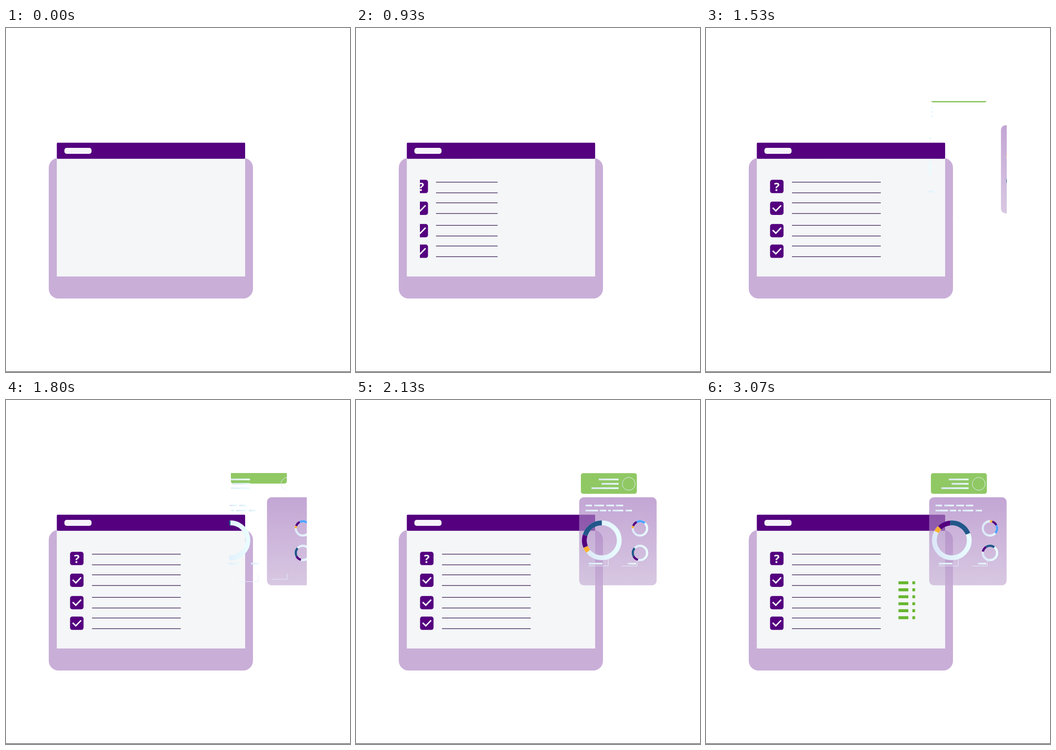
An HTML page for the animation above (3740 ms loop, 748x749 px).

```html
<!DOCTYPE html>
<html lang="en">
<head>
<meta charset="utf-8">
<title>Dashboard build-up</title>
<style>
  html, body { margin: 0; width: 100%; height: 100%; overflow: hidden; background: #fff; }
  svg { display: block; width: 100%; height: 100%; }
  text { font: 700 25px "Open Sans", "Noto Sans", sans-serif; }
</style>
</head>
<body>
<svg id="stage" viewBox="0 0 748 749">
  <defs>
    <linearGradient id="ice">
      <stop offset="0" stop-color="#dce8f8"/>
      <stop offset="1" stop-color="#e9fcff"/>
    </linearGradient>
    <linearGradient id="glass" x2="0" y2="1">
      <stop offset="0" stop-color="#a478be"/>
      <stop offset="1" stop-color="#c4abd3"/>
    </linearGradient>
  </defs>
</svg>
<script>
const LOOP = 3740, FPS = 15;
const PURPLE = '#54007f', TEAL = '#22578a', ORANGE = '#fdb333', SKY = '#4da3ff';

// First step of each entrance, and how far it has come after each step.
const START = { list: 9, cards: 23, chart: 37 };
const EASE = [0.06, 0.15, 0.25, 0.36, 0.505, 0.65, 0.79, 0.922, 1];

const stage = document.getElementById('stage');
const slides = [];
let markup = '';

const rect = (x, y, w, h, fill, r = 0, more = '') =>
  `<rect x="${x}" y="${y}" width="${w}" height="${h}" rx="${r}" fill="${fill}" ${more}/>`;

const bars = (y, ...spans) =>
  spans.map(([a, b]) => rect(a, y - 1.8, b - a, 3.6, 'url(#ice)')).join('');

const path = (d, color, width) =>
  `<path d="${d}" fill="none" stroke="${color}" stroke-width="${width}"/>`;

// A group that slides into its window from the offset (dx, dy).
function slide(phase, [x, y, w, h], dx, dy, content) {
  const i = slides.length;
  markup += `<clipPath id="win${i}">${rect(x, y, w, h, '#000')}</clipPath>
    <g clip-path="url(#win${i})"><g id="slide${i}">${content}</g></g>`;
  slides.push({ phase, dx, dy });
}

// Segments are [from, to, color], in degrees clockwise from the top.
function donut(cx, cy, r, width, turn, segments) {
  const ring = (color, more = '') =>
    `<circle cx="${cx}" cy="${cy}" r="${r}" fill="none" stroke="${color}" stroke-width="${width}" ${more}/>`;
  const arcs = segments.map(([a, b, color]) => ring(color,
    `pathLength="360" stroke-dasharray="${b - a} ${360 - b + a}" transform="rotate(${a - 90} ${cx} ${cy})"`));
  return ring('url(#ice)') +
    `<g class="spin" data-turn="${turn}" data-center="${cx} ${cy}">${arcs.join('')}</g>`;
}

function drawWindow() {
  markup += rect(93, 283, 444, 306, '#c9aed8', 21)
    + rect(110.5, 283, 409.5, 258, '#f4f6f8')
    + rect(110.5, 249.8, 409.5, 35, PURPLE, 2)
    + rect(127, 261, 59, 13, '#f6f3fb', 5)
    + rect(0, 748, 748, 1, '#222');
}

function drawList() {
  const tops = [330.6, 378, 426.7, 471.6];
  const icons = tops.map((y, i) => rect(139.3, y, 29.3, 29, PURPLE, 5) + (i
    ? path(`M145 ${y + 13.5}l6.8 6.6L163.3 ${y + 8.2}`, '#fff', 3)
    : `<text x="154" y="${y + 24.6}" fill="#fff" text-anchor="middle">?</text>`));
  slide('list', [139, 325, 35, 180], -34.5, 0, icons.join(''));

  const rules = [335.6, 380.6, 429.6, 474.6]
    .map(y => path(`M187 ${y}h193M187 ${y + 23.2}h193`, '#2c0a45', 1.3));
  slide('list', [174, 325, 207, 180], -206, 0, rules.join(''));
}

function drawCards() {
  slide('cards', [489, 159, 122, 46], 0, -45, rect(489, 159.3, 121.7, 45, '#90c864', 5));
  slide('cards', [489, 165, 83, 32], -82, 0,
    bars(173, [528, 571]) + bars(182.5, [534, 571]) + bars(192, [512, 571]));
  slide('cards', [575, 165, 36, 36], 38, 0,
    '<circle cx="593" cy="182.5" r="14" fill="none" stroke="url(#ice)"/>');

  slide('cards', [485, 211, 169, 193], 166, 0,
    rect(485.3, 211.7, 168.4, 191.8, 'url(#glass)', 10, 'opacity=".66"'));
  slide('cards', [485, 225, 116, 20], -117, 0,
    bars(229.7, [499, 513], [518, 539], [544, 561], [565, 581])
    + bars(240.7, [499, 526], [530, 544], [548, 554], [558, 581], [586, 600]));

  slide('cards', [485, 258, 94, 94], -94, 0, donut(534.5, 305.6, 38, 10.5, 68,
    [[231, 248, ORANGE], [248, 287, PURPLE], [287, 360, TEAL]]));
  slide('cards', [598, 258, 56, 100], 57, 0,
    donut(617.4, 279.6, 15.6, 4.8, 89,
      [[272, 290, ORANGE], [290, 334, PURPLE], [334, 402, SKY]])
    + donut(617.4, 333, 15.6, 4.8, 85,
      [[196, 242, PURPLE], [242, 312, TEAL]]));

  slide('cards', [485, 350, 60, 12], -58, 0, bars(356.3, [506, 536]));
  slide('cards', [485, 350, 130, 12], -118, 0, bars(356.3, [591, 609]));
  slide('cards', [500, 344, 55, 70], 0, 69, path('M505 361.3h43.5v-16', '#e6effa', 1));
  slide('cards', [575, 344, 42, 60], 0, 58, path('M578 361.5h33.5v-12', '#e6effa', 1));
}

function drawChart() {
  let rows = '';
  for (let i = 0; i < 6; i++) {
    const y = 394.8 + 15.2 * i;
    rows += rect(418.5, y, 21.5, 6.4, '#67b62f', 0.6) + rect(448.7, y, 6, 6.4, '#67b62f', 0.6);
  }
  slide('chart', [418, 390, 37.6, 92], 38, 0, rows);
}

drawWindow();
drawList();
drawCards();
drawChart();
stage.insertAdjacentHTML('beforeend', markup);
slides.forEach((s, i) => { s.node = document.getElementById('slide' + i); });
const spins = [...document.querySelectorAll('.spin')];

function progress(phase, step) {
  const i = step - START[phase];
  return i < 0 ? 0 : EASE[Math.min(i, EASE.length - 1)];
}

function render(time) {
  // The picture moves in held steps; the 4 ms absorb rounded step times.
  const step = Math.floor((time % LOOP + 4) * FPS / 1000);
  for (const { phase, dx, dy, node } of slides) {
    const p = progress(phase, step), rest = 1 - p;
    node.setAttribute('visibility', p ? 'visible' : 'hidden');
    node.setAttribute('transform', `translate(${dx * rest} ${dy * rest})`);
  }
  const turned = progress('chart', step);
  for (const { dataset, ...rest } of spins.map(node => ({ node, dataset: node.dataset }))) {
    rest.node.setAttribute('transform', `rotate(${dataset.turn * turned} ${dataset.center})`);
  }
}

const begin = performance.now();
function tick() {
  render(performance.now() - begin);
  requestAnimationFrame(tick);
}
tick();
</script>
</body>
</html>
```
